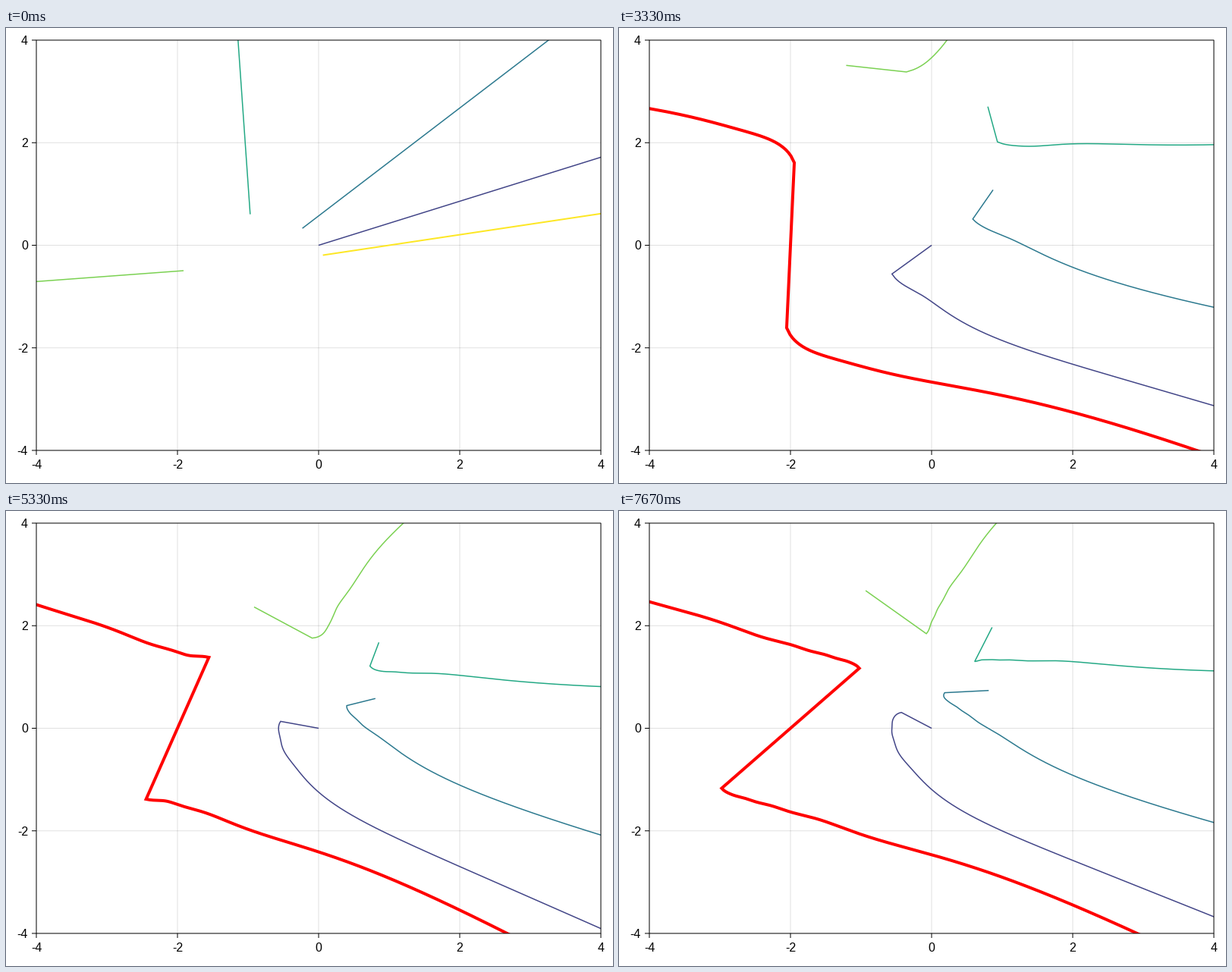
These frames come from a looping animation (800x600 px, 8000 ms). A matplotlib script:

```python
"""Spider algorithm for the period-5 angle 2/31, iterating z -> lam * (1 + z/2)**2."""
import numpy as np
import matplotlib.pyplot as plt
from matplotlib.animation import FuncAnimation
from matplotlib.patches import Rectangle

STEPS, LOOP_MS, TICK_MS = 24, 8000, 25
FRAMES = LOOP_MS // TICK_MS
WIDTH, HEIGHT, DPI = 800, 600, 100
LEFT, RIGHT, TOP, BOTTOM = 40, 784, 16, 557
PERIOD, FAR, RATIO = 5, 1e8, 1.1
TICKS = (-4, -2, 0, 2, 4)


def pt(pixels):
    return pixels * 72 / DPI


def radii_beyond(start):
    count = max(int(np.ceil(np.log(FAR / start) / np.log(RATIO))), 1)
    return np.geomspace(start, FAR, count + 1)[1:]


def standard_spider():
    """Straight legs, foot first, moved so that the first foot is at 0."""
    angles = [2 * np.pi * 2 / 31 * 2**k for k in range(PERIOD)]
    radii = np.concatenate([np.arange(1.0, 101.0), radii_beyond(100)])
    legs = [radii * np.exp(1j * a) - np.exp(1j * angles[0]) for a in angles]
    return legs, angles


def continuous_arg(leg, end_angle):
    """Argument followed along the leg, fixed by its direction at infinity."""
    arg = np.angle(leg)
    if abs(leg[0]) < 1e-9:
        arg[0] = arg[1]
    arg = np.unwrap(arg)
    return arg + 2 * np.pi * np.round((end_angle - arg[-1]) / (2 * np.pi))


def pull_back(legs, angles):
    args = [continuous_arg(leg, a) for leg, a in zip(legs, angles)]
    lam, lam_arg = abs(legs[1][0]), args[1][0]
    new_legs, new_angles = [], []
    for k in range(PERIOD):
        j = (k + 1) % PERIOD
        turn = np.pi if j == 0 else 0
        root = np.sqrt(np.abs(legs[j]) / lam)
        leg = 2 * root * np.exp(1j * ((args[j] - lam_arg) / 2 + turn)) - 2
        angle = (angles[j] - lam_arg) / 2 + turn
        tail = radii_beyond(abs(leg[-1] + 2)) * np.exp(1j * angle) - 2
        new_legs.append(np.concatenate([leg, tail]))
        new_angles.append(angle)
    return new_legs, new_angles


def visible(leg):
    return leg[np.abs(leg) < 40]


states = [standard_spider()]
while len(states) < STEPS:
    states.append(pull_back(*states[-1]))

fig = plt.figure(figsize=(WIDTH / DPI, HEIGHT / DPI), dpi=DPI, facecolor="white")
ax = fig.add_axes([LEFT / WIDTH, 1 - BOTTOM / HEIGHT,
                   (RIGHT - LEFT) / WIDTH, (BOTTOM - TOP) / HEIGHT])
ax.set(xlim=(-4, 4), ylim=(-4, 4))
ax.axis("off")

# Overlay in pixel units for the frame, ticks and labels.
overlay = fig.add_axes([0, 0, 1, 1])
overlay.set(xlim=(0, WIDTH), ylim=(HEIGHT, 0))
overlay.axis("off")


def stroke(xs, ys):
    overlay.plot(xs, ys, color="black", lw=pt(1), snap=False,
                 solid_capstyle="butt")


def label(x, y, value, align):
    overlay.text(x, y, str(value), ha=align, va="baseline",
                 family="Liberation Sans", size=pt(16), color="black")


for value in TICKS:
    x = LEFT + (value + 4) / 8 * (RIGHT - LEFT)
    y = BOTTOM - (value + 4) / 8 * (BOTTOM - TOP)
    stroke([x, x], [BOTTOM, BOTTOM + 6])
    stroke([LEFT - 6, LEFT], [y, y])
    label(x, 581, value, "center")
    label(29, y + 5.8, value, "right")
    if abs(value) < 4:
        grid = dict(color="black", alpha=0.12, lw=pt(1), snap=False, zorder=1)
        ax.axvline(value, **grid)
        ax.axhline(value, **grid)
overlay.add_patch(Rectangle((LEFT, TOP), RIGHT - LEFT, BOTTOM - TOP, fill=False,
                            edgecolor="black", lw=pt(1), snap=False))

leg_lines = [ax.plot([], [], color=plt.cm.viridis((k + 1) / PERIOD),
                     lw=pt(2 if k == PERIOD - 1 else 1.5),
                     solid_capstyle="butt", solid_joinstyle="miter")[0]
             for k in range(PERIOD)]
cut_line, = ax.plot([], [], color="red", lw=pt(4), zorder=3,
                    solid_capstyle="butt", solid_joinstyle="miter")


def update(frame):
    # A step shows from the tick in which it begins.
    step = ((frame + 1) * STEPS - 1) // FRAMES
    legs, _ = states[step]
    for line, leg in zip(leg_lines, legs):
        shown = visible(leg)
        line.set_data(shown.real, shown.imag)
    # Both preimages of the first leg, meeting at the critical point -2.
    half = visible(legs[-1])
    cut = np.concatenate([half[::-1], -4 - half[1:]]) if step else half[:0]
    cut_line.set_data(cut.real, cut.imag)
    return [*leg_lines, cut_line]


anim = FuncAnimation(fig, update, frames=FRAMES, interval=TICK_MS,
                     repeat=True, repeat_delay=0, blit=False)
plt.show()
```
